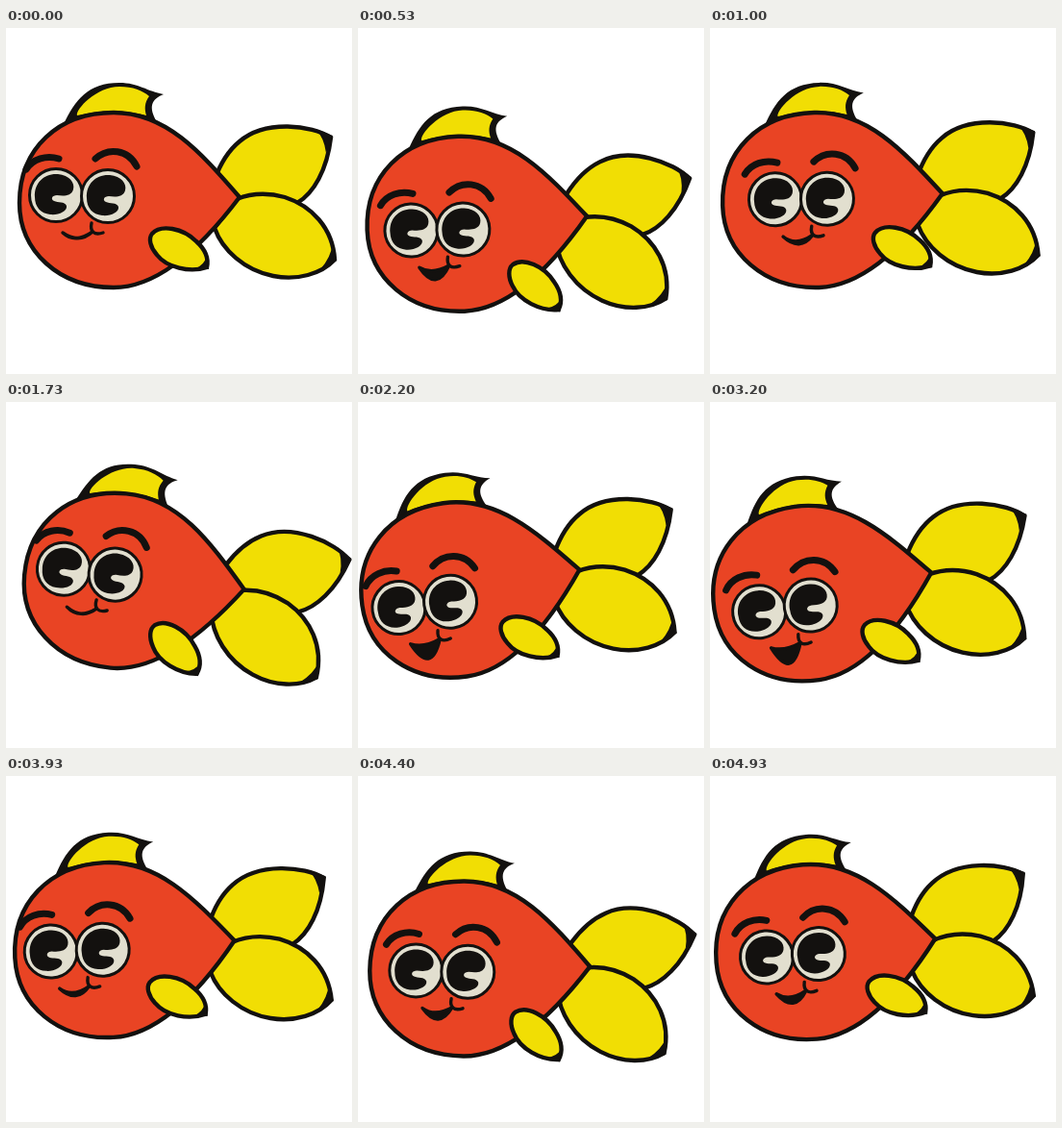
An HTML page for the animation above (5000 ms loop, 360 by 360 pixels).

```html
<!DOCTYPE html>
<html lang="en">
<head>
<meta charset="utf-8">
<title>Swimming goldfish</title>
<style>
  html, body { margin: 0; width: 100%; height: 100%; overflow: hidden; background: #fff; }
  svg { display: block; width: 100vw; height: 100vh; }
  .ink { fill: #13110f; }
  .line { fill: none; stroke-linecap: round; }
  .red { fill: #e94424; }
  .yellow { fill: #f1de04; }
  .cream { fill: #e2dfcf; }
  .edge, .line { stroke: #13110f; stroke-width: 4.4; }
  .thin { stroke-width: 3; }
  .brow { stroke-width: 7; }
  .mouth { stroke: #13110f; stroke-width: 3.4; stroke-linejoin: round; }
</style>
</head>
<body>
<svg viewBox="0 0 360 360">
  <defs>
    <g id="eye">
      <circle class="cream edge thin" r="27.5"/>
      <path class="ink" d="M-22 2C-23 -13 -12 -23 2 -22C14 -21 20 -13 18 -6C16 1 8 1 1 0C-4 0 -6 4 -2 6C2 8 9 6 11 11C12 17 2 21 -6 20C-16 19 -22 12 -22 2Z"/>
    </g>
  </defs>
  <g id="fish">
    <g id="tail">
      <path class="yellow edge" d="M338 114C318 101 270 95 243 118C232 127 223 141 217 158L214 172L243 178L303 182C320 172 334 148 338 114Z"/>
      <path class="ink" d="M340 112L322 105Q331 114 333 130Z"/>
      <path class="yellow edge" d="M342 241C340 208 318 185 290 176C272 171 255 172 240 178L217 208C225 231 248 252 278 258C303 263 328 256 342 241Z"/>
      <path class="ink" d="M344 242L340 224Q338 239 327 251Z"/>
    </g>
    <path class="ink" d="M60 100C72 75 85 57 118 57C138 57 147 66 164 69C151 74 148 82 157 98Z"/>
    <path class="yellow" d="M74 91C72 85 94 61 118 61C132 61 142 65 149 71C144 78 144 84 146 91C120 84 95 86 74 91Z"/>
    <path class="red edge" d="M14 182C14 125 55 88 112 88C167 88 203 130 243 176C215 213 165 270 112 270C55 270 14 232 14 182Z"/>
    <g id="face">
      <use href="#eye" x="52" y="174"/>
      <use href="#eye" x="106" y="175"/>
      <path class="line brow" d="M21 147C28 136 42 132 55 136M93 136C106 124 127 126 136 144"/>
      <path id="mouth" class="ink mouth"/>
      <path class="line mouth" d="M89 203C87 212 92 216 101 213" fill="none"/>
    </g>
    <g id="fin">
      <path class="yellow edge" d="M151 214C160 204 183 208 197 222C207 231 210 240 208 249C190 255 166 249 156 236C149 228 147 219 151 214Z"/>
      <path class="ink" d="M210 251L208 237Q206 246 195 251Z"/>
    </g>
  </g>
</svg>
<script>
const LOOP = 5000, STEPS = 75, CYCLE = 14.3;
const part = id => document.getElementById(id);
const [fish, tail, face, mouth, fin] = ["fish", "tail", "face", "mouth", "fin"].map(part);

// phase, x, y, body tilt, fin swing, face drop (0 to 1)
const keys = [
  [0, 0, 0, 0, 0, 0],
  [.049, -1, 0, -1.6, 1, .18],
  [.126, -5, 2, -3, 1.2, .2],
  [.175, -8, 4, -4.7, 1.5, .4],
  [.357, -11, 20, -8.1, 10, 1],
  [.55, -5, 25, -2.5, 15, .6],
  [.727, 4, 12, 5.2, 15.8, .12],
  [.818, 5, 7, 5.2, 12.3, -.12]
];

// Key at any index, wrapping the phase around the cycle
function keyAt(i) {
  const n = keys.length, turn = Math.floor(i / n);
  const [phase, ...values] = keys[i - turn * n];
  return [phase + turn, ...values];
}

// Smooth periodic curve through the keys
function pose(phase) {
  const i = keys.findLastIndex(k => k[0] <= phase);
  const [a, b, c, d] = [-1, 0, 1, 2].map(o => keyAt(i + o));
  const h = c[0] - b[0], u = (phase - b[0]) / h, v = 1 - u;
  return b.slice(1).map((from, j) => {
    const to = c[j + 1];
    const m0 = h * (to - a[j + 1]) / (c[0] - a[0]);
    const m1 = h * (d[j + 1] - from) / (d[0] - b[0]);
    return v * v * ((1 + 2 * u) * from + u * m0) + u * u * ((3 - 2 * u) * to - v * m1);
  });
}

function draw(time) {
  const step = Math.floor((time % LOOP + 4) * STEPS / LOOP) % STEPS;
  const cycles = step / CYCLE;
  const [x, y, tilt, swing, drop] = pose(cycles % 1);
  const turn = (1 - Math.cos(Math.PI * cycles)) / 2;   // face turns once per two cycles
  const gape = Math.max(0, drop);

  fish.setAttribute("transform", `translate(${x} ${y}) rotate(${tilt} 112 179)`);
  tail.setAttribute("transform", `rotate(${swing} 243 177)`);
  face.setAttribute("transform", `translate(${18 * turn - 5 * drop} ${17 * drop})`);
  fin.setAttribute("transform", `translate(${1 + 20 * turn} ${.6 * swing}) rotate(${swing} 150 215)`);
  mouth.setAttribute("d", `M59 213Q72 ${225 - 6 * gape} 90 212Q76 ${225 + 26 * gape} 59 213Z`);
}

function tick() {
  draw(performance.now());
  requestAnimationFrame(tick);
}
tick();
</script>
</body>
</html>
```
